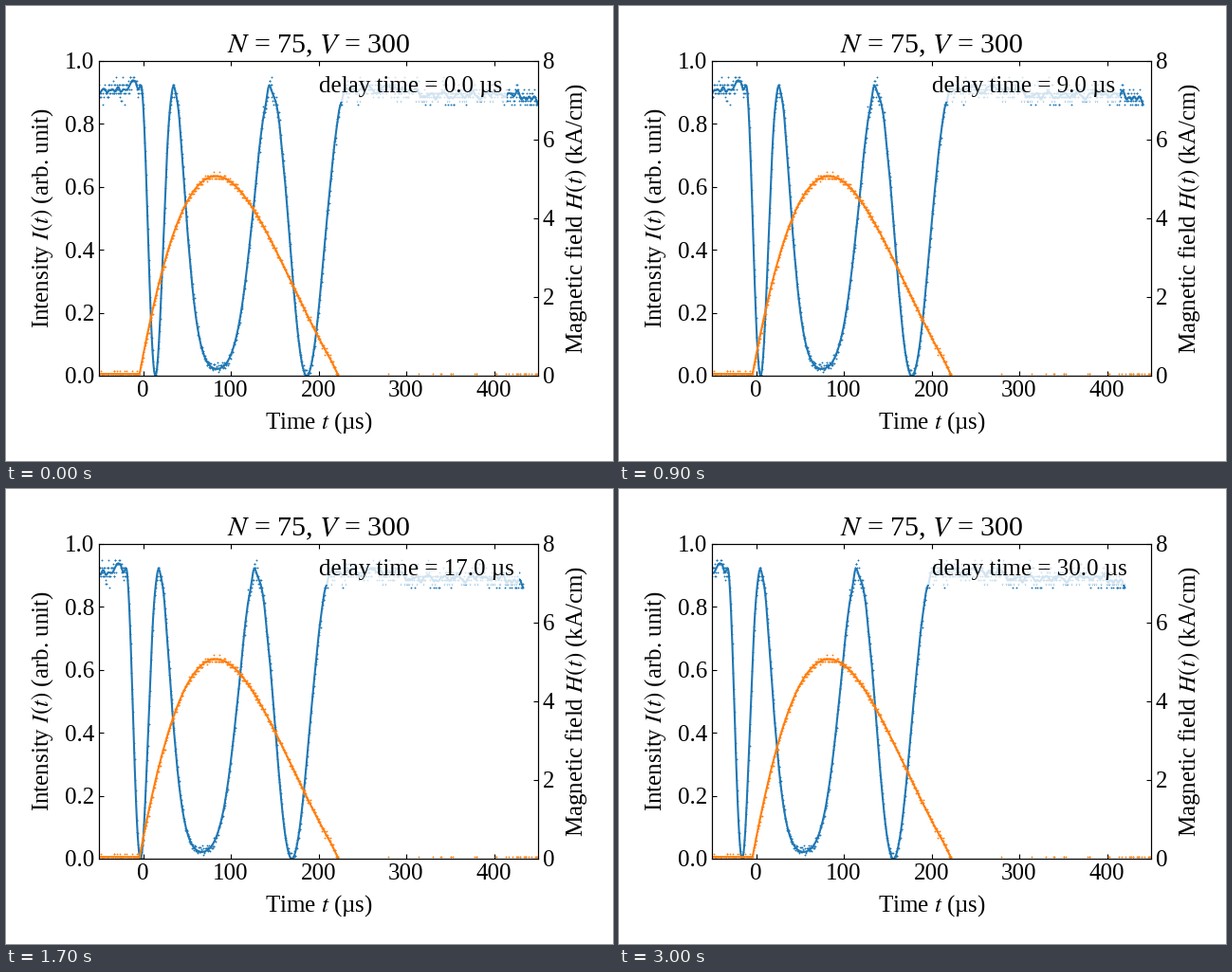
A matplotlib script for the animation above (3.1 s loop, 640x480 px).

```python
import numpy as np
import matplotlib.pyplot as plt
from matplotlib.animation import FuncAnimation

plt.rcParams.update({
    "font.family": "Liberation Serif",
    "font.size": 18,
    "mathtext.fontset": "stix",
    "xtick.direction": "in",
    "ytick.direction": "in",
    "xtick.top": True,
})

BLUE, ORANGE = "tab:blue", "tab:orange"
FRAMES = 31
rng = np.random.default_rng(7)


def pulse(t):
    """Damped half sine of the field, in kA/cm."""
    s = np.clip(t + 4, 0, 229)
    return 8.73 * np.exp(-0.00542 * s) * np.sin(np.pi * s / 229)


def quantise(y, step, offset):
    return np.round((y - offset) / step) * step + offset


def smooth(y, n):
    """Weighted moving average over an odd number of points."""
    window = np.hanning(n + 2)[1:-1]
    return np.convolve(np.pad(y, n // 2, mode="edge"), window / window.sum(), "valid")


def bump(t, centre, width, height):
    return height * np.exp(-((t - centre) / width) ** 2)


t = np.arange(-100, 450.1, 0.5)

# Magnetic field, with a small zero drift after the pulse
drift = np.interp(t, [-100, 0, 80, 215, 228, 260, 450],
                  [0.05, 0.04, 0, 0, -0.14, -0.09, -0.02])
field = pulse(t) + drift
field_pts = quantise(field + rng.normal(0, 0.045, t.size), 0.08, -0.03)

# Intensity follows the field through its phase, slightly late
lag = np.interp(t, [-5, 14, 35, 84, 146, 187, 226, 240],
                [1.8, 2.1, 1.7, 1, 1.4, 4, 7.5, 9])
level = np.interp(t, [-100, 0, 35, 146, 250, 308, 318, 450],
                  [0.905, 0.91, 0.922, 0.912, 0.908, 0.905, 0.892, 0.888])
clean = level * np.cos(0.9 * pulse(t - lag)) ** 2
wander = smooth(rng.normal(0, 0.022, t.size), 13)
wander += bump(t, -11, 3, 0.02) + bump(t, -34, 3, -0.015) + bump(t, 247, 5, 0.015)
flat = (clean / level) ** 2
intensity = clean + wander * flat
noise = rng.normal(0, 1, t.size) * (0.009 + 0.007 * flat)
intensity_pts = quantise(intensity + noise, 0.0125, 0.86)
on_slope = flat < 0.8
intensity_pts[on_slope] = (intensity + noise)[on_slope]
plateau = ~on_slope & ((t < 0) | (t > 230))
intensity_pts[plateau] = np.maximum(intensity_pts[plateau], 0.86)

fig = plt.figure(figsize=(6.4, 4.8), dpi=100, facecolor="white")
ax = fig.add_axes([98.25 / 640, 90 / 480, 462.5 / 640, 332.4 / 480])
ax2 = ax.twinx()

points = dict(ls="none", marker="+", ms=2, mew=0.6)
line, = ax.plot(t, intensity, color=BLUE, lw=1.5)
dots, = ax.plot(t, intensity_pts, color=BLUE, **points)
ax2.plot(t, field, color=ORANGE, lw=1.5)
ax2.plot(t, field_pts, color=ORANGE, **points)

ax.set(xlim=(-50, 450), ylim=(0, 1), xticks=range(0, 401, 100))
ax.set_yticks(np.arange(6) / 5)
ax2.set(ylim=(0, 8), yticks=range(0, 9, 2))
ax.set_title("$N$ = 75, $V$ = 300")
ax.set_xlabel("Time $t$ (µs)", labelpad=7)
ax.set_ylabel("Intensity $I(t)$ (arb. unit)", labelpad=7)
ax2.set_ylabel("Magnetic field $H(t)$ (kA/cm)", labelpad=7)
label = ax.text(200, 0.9, "", bbox=dict(facecolor="white", edgecolor="none", alpha=0.8))


def update(i):
    line.set_xdata(t - i)
    dots.set_xdata(t - i)
    label.set_text(f"delay time = {i:.1f} µs")
    return line, dots, label


anim = FuncAnimation(fig, update, frames=FRAMES, interval=100,
                     init_func=lambda: update(0), repeat=True, repeat_delay=0)
plt.show()
```
